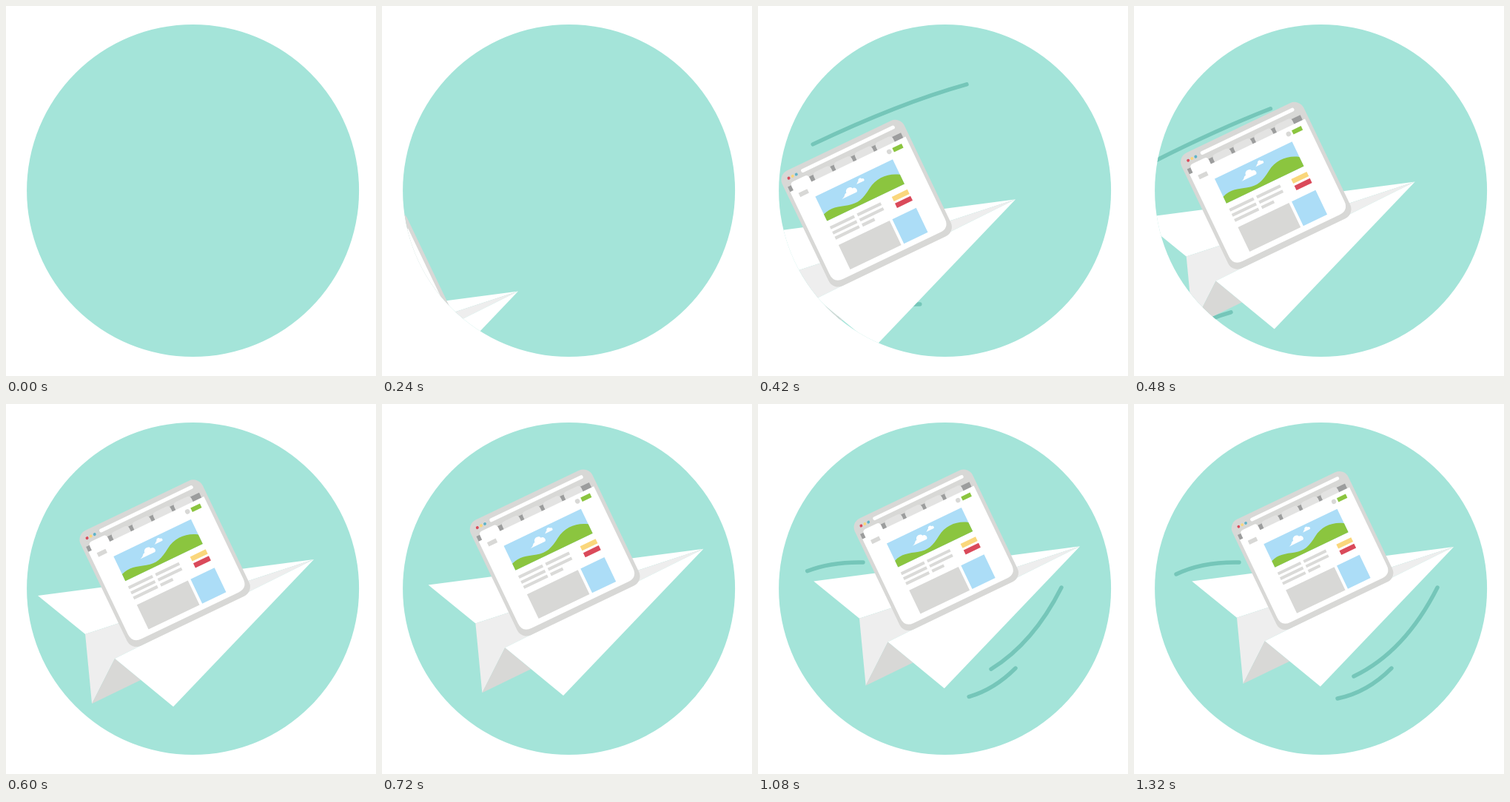
An HTML page for the animation above (2.16 s loop, 500 by 500 pixels).

```html
<!DOCTYPE html>
<html lang="en">
<head>
<meta charset="utf-8">
<title>Paper plane</title>
<style>
  html, body { margin: 0; width: 100%; height: 100%; overflow: hidden; background: #fff; }
  svg { display: block; width: 100vw; height: 100vh; }
  .streak { fill: none; stroke: #75c6b9; stroke-width: 5.4; stroke-linecap: round; visibility: hidden; }
  .white { fill: #fff; }
  .light { fill: #eee; }
  .grey { fill: #d8d8d6; }
  .dark { fill: #9c9d9d; }
  .tab { fill: #e3e3e2; }
  .sky { fill: #acddf7; }
  .green { fill: #8bc53f; }
  .yellow { fill: #fad77c; }
  .red { fill: #da4a5a; }
  .text { fill: none; stroke: #dadad8; stroke-width: 4.2; }
</style>
</head>
<body>
<svg viewBox="0 0 500 500">
  <defs>
    <clipPath id="disc"><circle cx="252.6" cy="249.5" r="224.5"/></clipPath>
    <path id="cloud" d="M0 0C6-1 5-5 9-5C9-11 18-12 19-7C24-8 25-1 22 0Z"/>
    <path id="tab" d="M0 10.5V5Q0 0 5 0H21Q26 0 26 5V10.5Z"/>
  </defs>
  <circle cx="252.6" cy="249.5" r="224.5" fill="#a4e4d9"/>
  <g clip-path="url(#disc)">
    <path class="streak" pathLength="1" d="M374 87Q230 104 0 224"/>
    <path class="streak" pathLength="1" d="M292 397C255 417 185 380 75 436"/>
    <path class="streak" pathLength="1" d="M142 214Q92 213 57 230"/>
    <path class="streak" pathLength="1" d="M410 248Q366 335 297 368"/>
    <path class="streak" pathLength="1" d="M348 357Q315 390 275 398"/>

    <g id="plane">
      <path class="white" d="M43 259L416 210L107 311Z"/>
      <path class="light" d="M107 311L416 210L147 344L116 405Z"/>
      <path class="grey" d="M147 344L116 405L182 373Z"/>
      <path class="white" d="M147 344L416 210L226 409Z"/>

      <g transform="translate(214.6 215.3) rotate(-25.6) translate(-91.5 -86.5)">
        <rect class="grey" width="183" height="173" rx="14"/>
        <path d="M33 9.4H168" stroke="#fff" stroke-width="5" stroke-linecap="round"/>
        <circle class="red" cx="11.4" cy="10.4" r="2"/>
        <circle class="yellow" cx="17.2" cy="10.2" r="2"/>
        <circle cx="22.8" cy="10.2" r="2" fill="#5fb3c8"/>

        <rect class="dark" x="5" y="20.5" width="169.5" height="8"/>
        <g id="tabs"></g>
        <path class="white" d="M5 28H10V22Q10 17 15 17H32Q37 17 37 22V28H178V151Q178 165 164 165H19Q5 165 5 151Z"/>

        <rect class="grey" x="14.5" y="34.2" width="13" height="6"/>
        <circle class="grey" cx="149.2" cy="36.8" r="3.3"/>
        <rect class="green" x="155" y="34.2" width="14" height="6"/>

        <rect class="sky" x="33" y="48.2" width="116" height="36.8"/>
        <use href="#cloud" class="white" x="64" y="67"/>
        <use href="#cloud" class="white" transform="translate(89.5 57.5) scale(.55)"/>
        <path class="green" d="M33 75C45 70 55 74 68 78S90 79 104 70S135 62 149 71V85H33Z"/>

        <rect class="yellow" x="126" y="93.3" width="23.3" height="6.8"/>
        <rect class="red" x="126" y="103.2" width="23.3" height="6.8"/>
        <path class="text" d="M33 95.3H69M73.5 95.3H109M33 103H69M73.5 103H109M33 110.7H69M73.5 110.7H92"/>
        <rect class="grey" x="33" y="121" width="76.5" height="36.5"/>
        <rect class="sky" x="113.5" y="121" width="35.8" height="36.5"/>
      </g>
    </g>
  </g>
</svg>
<script>
  const LOOP = 2160, STEP = 30, LAST = 1320;
  const plane = document.getElementById('plane');
  const streaks = [...document.querySelectorAll('.streak')];

  document.getElementById('tabs').innerHTML = [0, 1, 2, 3]
    .map(i => `<use href="#tab" class="tab" x="${42.8 + 31 * i}" y="18.2"/>`).join('');

  const span = (t, from, to) => Math.min(1, Math.max(0, (t - from) / (to - from)));
  const inOut = p => (1 - Math.cos(Math.PI * p)) / 2;
  const out = p => 1 - (1 - p) ** 3;

  // Fourth root of the distance left to fly, by time
  const glide = [[180, 4.3], [330, 3.567], [480, 2.806], [600, 2.25], [690, 1.81], [840, 0.8], [1320, 0]];

  function distance(t) {
    if (t <= glide[0][0]) return glide[0][1] ** 4;
    const i = glide.findIndex(([time]) => t <= time);
    const [t0, a] = glide[i - 1], [t1, b] = glide[i];
    return (a + (b - a) * span(t, t0, t1)) ** 4;
  }

  function trim(path, start, end) {
    path.style.visibility = end > start ? 'visible' : 'hidden';
    path.style.strokeDasharray = `${Math.max(0, end - start)} 9`;
    path.style.strokeDashoffset = -start;
  }

  function draw(t) {
    const d = distance(t);
    const scale = 1 - 0.052 * inOut(span(t, 600, 1380));
    plane.setAttribute('transform',
      `translate(${255.2 - d} ${239.7 + 0.757 * d}) scale(${scale}) translate(-229.5 -259.2)`);

    trim(streaks[0], inOut(span(t, 308, 655)), inOut(span(t, 280, 480)));
    trim(streaks[1], inOut(span(t, 330, 560)), inOut(span(t, 312, 450)));
    const grown = out(span(t, 836, LAST));
    streaks.slice(2).forEach(path => trim(path, 0, grown));
  }

  const begin = performance.now();
  function tick() {
    const t = (performance.now() - begin) % LOOP;
    draw(Math.min(LAST, Math.floor(t / STEP) * STEP));
    requestAnimationFrame(tick);
  }
  tick();
</script>
</body>
</html>
```
